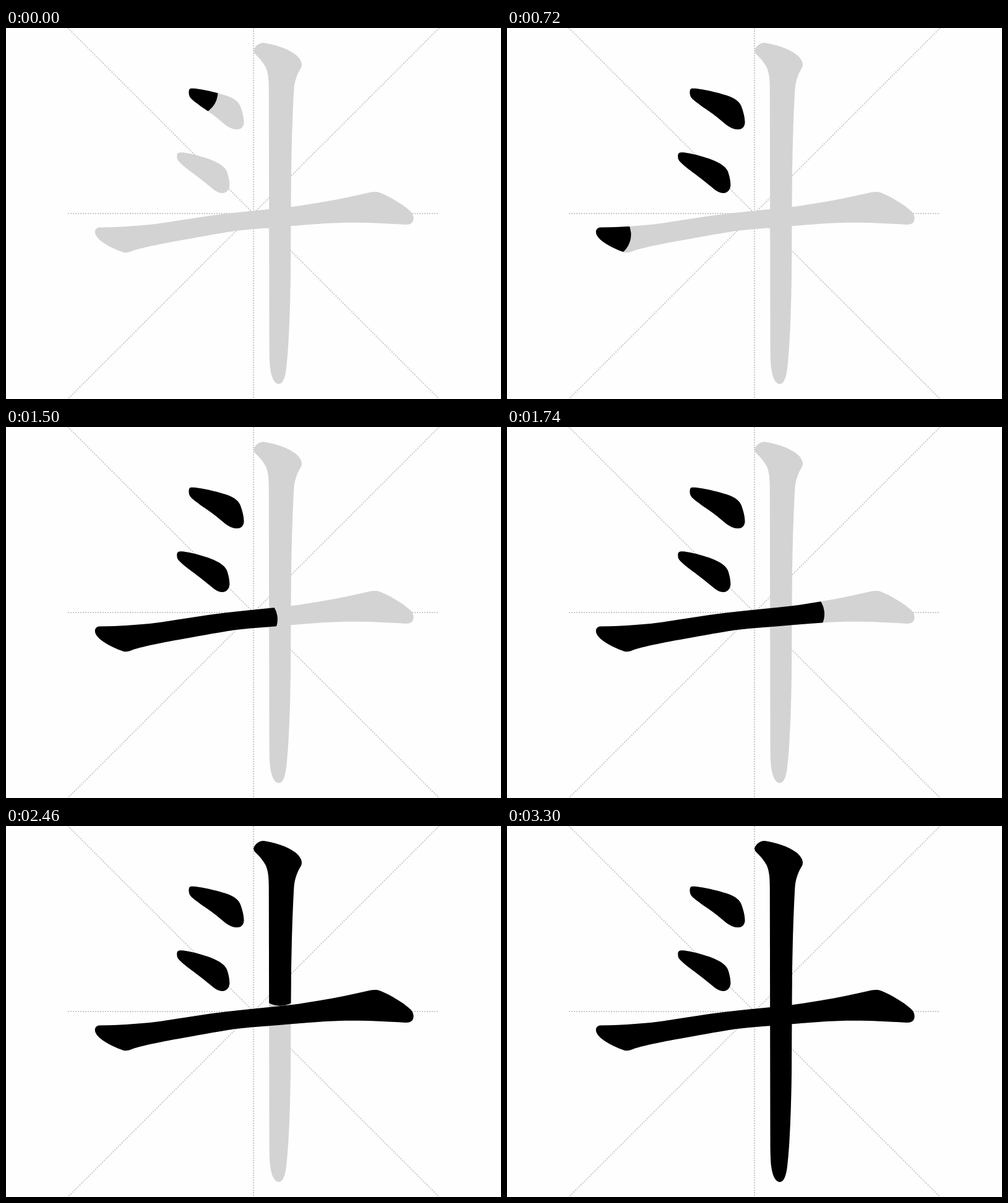
These frames come from a looping animation (800x600 px, 3360 ms). An HTML page:

```html
<!DOCTYPE html>
<html lang="zh">
<head>
<meta charset="utf-8">
<title>Stroke order</title>
<style>
  html, body { margin: 0; width: 100%; height: 100%; overflow: hidden; background: #fefefe; }
  svg { display: block; width: 800px; height: 600px; }
  .grid { fill: none; stroke: #c9c9c9; stroke-width: 2; stroke-dasharray: 2 2; }
  .ghost { fill: #d3d3d3; }
  .pen { fill: none; stroke: #000; stroke-width: 75; stroke-linecap: round; stroke-linejoin: round; }
</style>
</head>
<body>
<svg viewBox="0 0 800 600">
  <g class="grid">
    <path d="M100 0L700 600"/>
    <path d="M700 0L100 600"/>
    <path d="M400 0V600"/>
    <path d="M100 300H700"/>
  </g>
  <g id="ghosts"></g>
  <g id="pens"></g>
</svg>
<script>
const LOOP = 3360, STEP = 60;

// shape: outline, line: pen path, steps: [ms, length drawn]; the end time closes the path
const strokes = [
  {
    shape: 'M295.5 105C295.5 101 296 98 299 97.8C308 96.5 342 104.5 355 109C367 113 375 118 378.5 126C382 135 384.5 145 384.5 153C384 161 379 164 373 164C366 164 361 161 355 157C345 149 336 141 326 134.3C314 126 307 121 300 115C297 112 295.5 109 295.5 105Z',
    line: 'M304.5 103.5L335 121L372 148',
    steps: [[0, 0.5]], end: 260
  },
  {
    shape: 'M276.3 208C276.3 204 277 202 280 201.5C289 200 318 208 331 213C345 218.5 353 224 356.5 231C359.5 238 361.5 248 361.3 255C360.5 263 355 267 350 267C344 267 339 264 334 260C322 250 308 239 297 231C290 226 283 220 279 215.5C277 213 276.3 211 276.3 208Z',
    line: 'M286 207L316 226L350 250',
    steps: [[450, 0.5]], end: 700
  },
  {
    shape: 'M143.8 330C143.8 325 147 322.5 152 322.5C195 321.5 230 319 262 314C300 308 330 303 372 298.5C400 295.5 430 293 461 289.3C500 284 545 276 583 267C592 264.5 600 264 606 267C620 273 640 284 652 295C657 299 659 304 658.5 309C658 315 654 318 646 318C615 316 590 314.7 561 314.7C530 314.7 495 317 461 320.3C430 323.3 400 324.5 372 328C350 331 330 335 290 342C255 348 225 354 207 359.5C200 362.5 196 364 190 363C178 359 163 352 153 344C147 339 143.8 334 143.8 330Z',
    line: 'M156 332L192 343L253.5 332L401.5 311L550 294L605.5 291L645 303',
    steps: [[698, 0.5], [1020, 100.1]], end: 2292
  },
  {
    shape: 'M400 36C403 28 410 24 416 24C432 26 455 33 468 43C476 50 480 57 477 64C472 72 467 83 465.5 97C463 140 461 200 460.5 290L460 400C459 470 456.5 520 453 550C451 567 447 575.7 441 575.7C434 575.7 429 566 427 550C426 540 425.5 530 425.5 500L424.8 100C424.8 84 424 73 419.5 63C415 55 409 48 403 42.5C401 40.5 400 38 400 36Z',
    line: 'M412 38L446 62V96.5L443 253.5L441 523L440 560',
    steps: [[1748, 0.5], [1980, 76], [2460, 233], [2700, 319], [3240, 502]], end: 3352
  }
];

function add(parent, tag, attrs) {
  const el = document.createElementNS('http://www.w3.org/2000/svg', tag);
  for (const key in attrs) el.setAttribute(key, attrs[key]);
  return parent.appendChild(el);
}

const ghosts = document.getElementById('ghosts');
const pens = document.getElementById('pens');

strokes.forEach(({ shape, line, steps, end }, i) => {
  add(ghosts, 'path', { class: 'ghost', d: shape });
  add(add(pens, 'clipPath', { id: 'clip' + i }), 'path', { d: shape });
  const group = add(pens, 'g', { 'clip-path': `url(#clip${i})` });
  const pen = add(group, 'path', { class: 'pen', d: line });

  const total = pen.getTotalLength();
  pen.style.strokeDasharray = `${total}px 3000px`;
  const key = (ms, drawn) => ({ offset: ms / LOOP, strokeDashoffset: `${total - drawn}px` });

  const start = steps[0][0];
  const hidden = start ? [key(0, -100), key(start, -100)] : [];
  const frames = [...hidden, ...steps.map(s => key(...s)), key(end, total), key(LOOP, total)];
  pen.animate(frames, {
    duration: LOOP,
    iterations: Infinity,
    easing: `steps(${LOOP / STEP})`
  });
});
</script>
</body>
</html>
```
